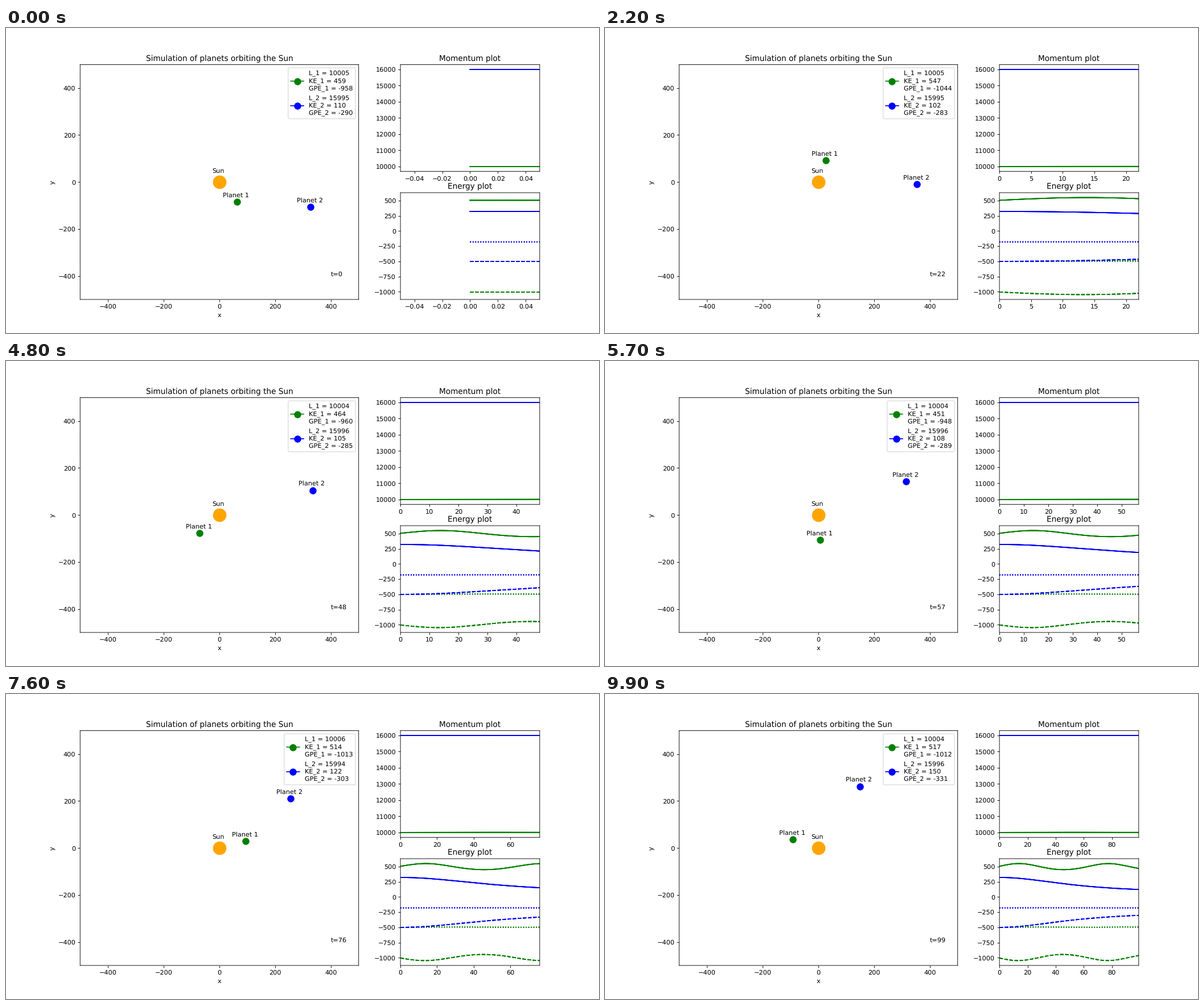
Recreate the animation shown at these times as a matplotlib script. Size 1042 by 537 pixels, loop 10000 ms.

```python
import numpy as np
import matplotlib.pyplot as plt
from matplotlib.animation import FuncAnimation

# Unsnapped strokes and unhinted type keep true sub-pixel proportions
plt.rcParams.update({"font.family": "DejaVu Sans", "path.snap": False,
                     "text.hinting": "none"})

W, H, DPI = 1042, 537, 81.4
FRAMES, LEAD = 100, 116          # LEAD: steps already done when the view starts
STROKES = 4                      # repeated strokes firm up the soft line edges
G, M_SUN, MASS = 1.0, 1e4, 10.0
COLORS = ("green", "blue")


def pull(offset, mass):
    """Acceleration towards a body of the given mass at this offset."""
    return G * mass * offset / np.hypot(*offset) ** 3


def simulate(steps):
    pos = np.array([[100.0, 0.0], [-200.0, 0.0]])
    vel = np.array([[0.0, 10.0], [0.0, -8.0]])
    path, speed = [], []
    for _ in range(steps):
        gap = pos[1] - pos[0]
        acc = np.array([pull(-pos[0], M_SUN) + pull(gap, MASS),
                        pull(-pos[1], M_SUN) + pull(-gap, MASS)])
        vel = vel + acc
        pos = pos + vel
        path.append(pos)
        speed.append(vel)
    return np.array(path), np.array(speed)


# Arrays are indexed [step, planet, axis]
path, vel = simulate(FRAMES + LEAD + 1)
ang = MASS * (path[..., 0] * vel[..., 1] - path[..., 1] * vel[..., 0])
kin = 0.5 * MASS * (vel ** 2).sum(axis=-1)
pot = -G * M_SUN * MASS / np.hypot(path[..., 0], path[..., 1])
steps = np.arange(len(path))

fig = plt.figure(figsize=((W + 0.01) / DPI, (H + 0.01) / DPI), dpi=DPI,
                 facecolor="white")
grid = fig.add_gridspec(2, 2, width_ratios=[2, 1])
orbit = fig.add_subplot(grid[:, 0])
momentum = fig.add_subplot(grid[0, 1])
energy = fig.add_subplot(grid[1, 1])

orbit.set(xlim=(-500, 500), ylim=(-500, 500), xlabel="x", ylabel="y",
          title="Simulation of planets orbiting the Sun")
orbit.plot(0, 0, "o", color="orange", markersize=20)
orbit.text(-25, 40, "Sun")
clock = orbit.text(400, -400, "")
planets = [orbit.plot([], [], "-o", color=c, markersize=10, label=c)[0]
           for c in COLORS]
names = [orbit.text(0, 0, f"Planet {i + 1}") for i in range(2)]
legend = orbit.legend(loc="upper right", labelspacing=0.53)
for entry in legend.get_texts():
    entry.set_linespacing(1.28)

momentum.set_title("Momentum plot")
energy.set_title("Energy plot")


def curve(ax, values, color, style="-"):
    for _ in range(STROKES):
        ax.plot(steps, values, style, color=color)


for i, c in enumerate(COLORS):
    curve(momentum, ang[:, i], c)
    curve(energy, kin[:, i], c)
    curve(energy, pot[:, i], c, "--")
    curve(energy, kin[:, i] + pot[:, i], c, ":")


def update(t):
    s = t + LEAD
    for i, entry in enumerate(legend.get_texts()):
        x, y = path[s, i]
        planets[i].set_data([x], [y])
        names[i].set_position((x - 50, y + 20))
        n = i + 1
        entry.set_text(f"L_{n} = {ang[s, i]:.0f}\n"
                       f"KE_{n} = {kin[s, i]:.0f}\n"
                       f"GPE_{n} = {pot[s, i]:.0f}")
    clock.set_text(f"t={t}")
    span = (0, t) if t else (-0.05, 0.05)
    momentum.set_xlim(*span)
    energy.set_xlim(*span)
    return []


anim = FuncAnimation(fig, update, frames=FRAMES, interval=100,
                     init_func=lambda: update(0), repeat=True,
                     repeat_delay=0, blit=False)
plt.show()
```
